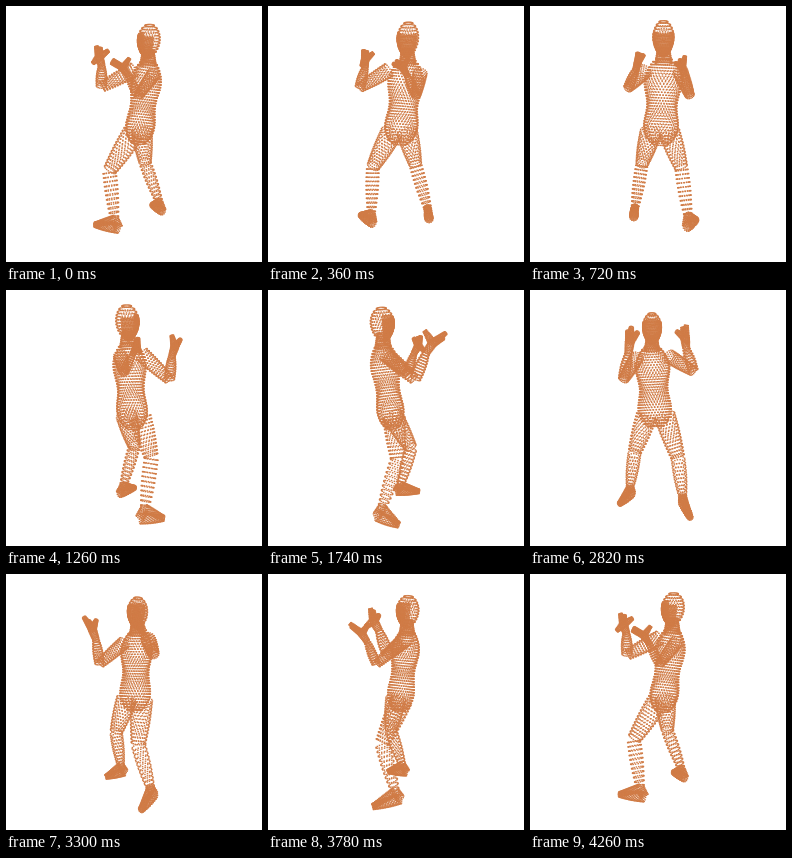
Recreate the animation shown at these times as an HTML page with a canvas. Size 256 px wide and 256 px high, loop 4320 ms.

```html
<!DOCTYPE html>
<html lang="en">
<head>
<meta charset="utf-8">
<title>Rotating point body</title>
<style>
html, body { margin: 0; width: 100%; height: 100%; overflow: hidden; background: #fff; }
canvas { display: block; }
</style>
</head>
<body>
<canvas id="stage" width="256" height="256"></canvas>
<script>
const ctx = document.getElementById('stage').getContext('2d');
const { PI, sin, cos, sqrt, hypot, max, round } = Math;
const LOOP = 4320, STEP = 60;
const CENTER = 128, HORIZON = 92, DISTANCE = 250;
const SIDE = [0.57, 0, 0.82]; // shoulder axis
const points = [];

const dot = (a, b) => a[0] * b[0] + a[1] * b[1] + a[2] * b[2];
const cross = (a, b) => [
  a[1] * b[2] - a[2] * b[1],
  a[2] * b[0] - a[0] * b[2],
  a[0] * b[1] - a[1] * b[0]
];
const unit = a => a.map(c => c / hypot(...a));
const mix = (a, b, t) => a.map((c, k) => c + (b[k] - c) * t);

// Staggered rings of points from a to b; radius(t) is the half width,
// depth its ratio front to back.
function skin(a, b, radius, { gap, count, depth = 1, start = 0, arc = 2 * PI }) {
  const delta = b.map((c, k) => c - a[k]);
  const axis = unit(delta);
  const lean = dot(SIDE, axis);
  const u = unit(SIDE.map((c, k) => c - lean * axis[k]));
  const v = cross(axis, u);
  const rings = max(2, round(hypot(...delta) / gap));
  for (let j = 0; j < rings; j++) {
    const t = (j + 0.5) / rings, r = radius(t), mid = mix(a, b, t);
    for (let n = 0; n < count; n++) {
      const phi = start + arc * (n + j % 2 / 2) / count;
      points.push(mid.map((c, k) => c + r * (u[k] * cos(phi) + depth * v[k] * sin(phi))));
    }
  }
}

const limb = (a, b, ra, rb, mesh, bulge = 0) =>
  skin(a, b, t => ra + (rb - ra) * t + bulge * sin(PI * t), mesh);

const FINE = { gap: 1.5, count: 12 };
const ARM = { gap: 2.6, count: 17 };
const THIGH = { gap: 3.2, count: 19 };
const SHIN = { gap: 3.9, count: 15 };

function leg(hip, knee, ankle, heel, toe) {
  limb(hip, knee, 10.5, 6.3, THIGH, 0.8);
  limb(knee, ankle, 6.3, 3.6, SHIN, 1);
  limb(ankle, heel, 3.6, 3.8, FINE);
  limb(heel, toe, 4, 2.3, FINE, 0.6);
  limb(ankle, toe, 3.6, 2, FINE);
}

function arm(shoulder, elbow, wrist, palm, tips) {
  limb(shoulder, elbow, 7, 4.5, ARM, 0.5);
  limb(elbow, wrist, 4.5, 3, ARM, 1);
  limb(wrist, palm, 3, 3.8, FINE);
  for (const tip of tips) limb(palm, tip, 3.6, 1.5, FINE);
}

// Torso: waist and hips follow a cosine, both ends are rounded off
skin([15, 54, -2], [4, 138, 0],
  t => (17 + 2.5 * cos(10 * (t - 0.22))) * sin(PI * t) ** 0.25,
  { gap: 2.7, count: 34, depth: 0.78 });

// Head with a denser face, then the neck
const egg = t => 9.8 * sin(PI * t ** 0.88) ** 0.55;
const crown = [15.5, 19, -3], chin = [13.5, 53, -2];
skin(crown, chin, egg, { gap: 2.8, count: 24, depth: 1.18 });
skin(mix(crown, chin, 0.3), chin, t => egg(0.3 + 0.7 * t),
  { gap: 1.2, count: 26, depth: 1.18, start: PI, arc: PI });
limb([14, 44, -2], [14, 60, -2], 5.5, 8, { gap: 1.8, count: 22 });

leg([0, 125, -8], [-24, 163, -6], [-18, 205, -17], [-14, 212, -20], [-38, 214, -9]);
leg([8, 125, 8], [12, 162, 20], [27, 203, 17], [30, 211, 13], [20, 213, 33]);

arm([1, 65, -14], [-30, 82, -20], [-31, 61, -10], [-34, 52, -6],
  [[-37, 41, -5], [-25, 45, -3], [-41, 58, -3], [-33, 42, -4]]);
arm([21, 66, 12], [5, 90, 36], [-7, 66, 37], [-13, 57, 39],
  [[-25, 47, 44], [-27, 51, 39], [-5, 46, 37]]);

function draw(now) {
  const angle = 2 * PI * Math.floor(now % LOOP / STEP) * STEP / LOOP;
  const c = cos(angle), s = sin(angle);
  ctx.fillStyle = '#fff';
  ctx.fillRect(0, 0, 256, 256);
  ctx.fillStyle = '#d07c47';
  for (const [x, y, z] of points) {
    const scale = DISTANCE / (DISTANCE + z * c - x * s);
    const px = CENTER + (x * c + z * s) * scale;
    const py = HORIZON + (y - HORIZON) * scale;
    ctx.fillRect(px - 0.75, py - 0.7, 1.5, 1.4);
  }
}

const begin = performance.now();
function tick() {
  draw(performance.now() - begin);
  requestAnimationFrame(tick);
}
tick();
</script>
</body>
</html>
```
